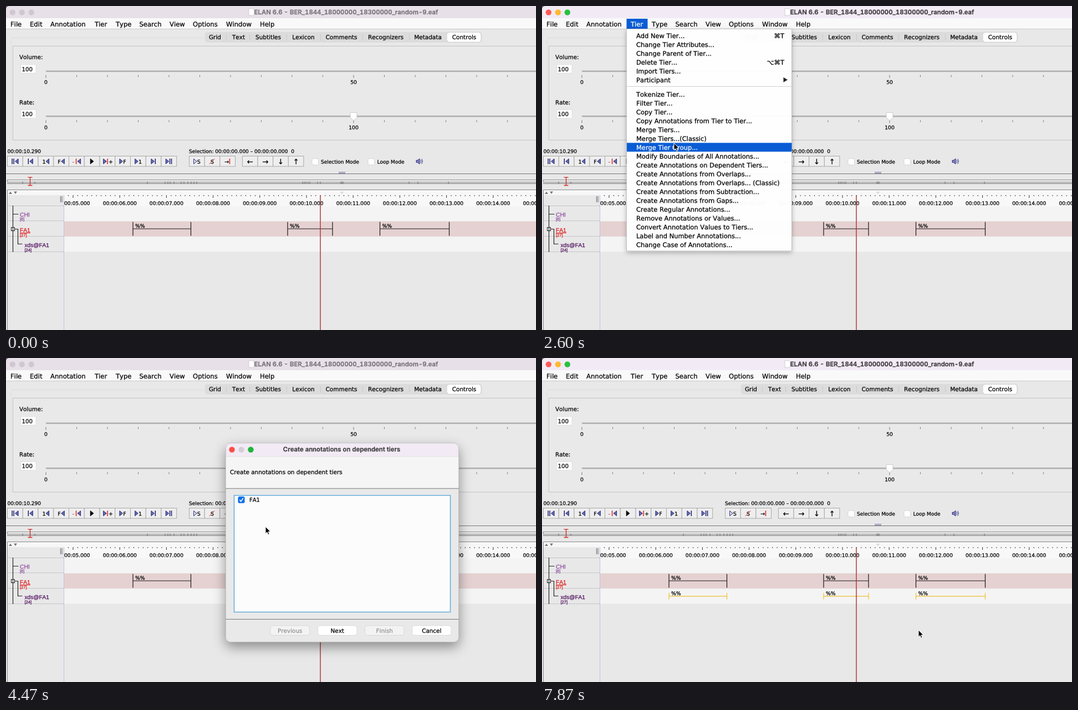
Write an HTML page that moves like this. It is 956 px wide and 586 px high and loops after 8000 ms.

```html
<!DOCTYPE html>
<html lang="en">
<head>
<meta charset="utf-8">
<title>Create annotations on dependent tiers</title>
<style>
html, body { margin: 0; width: 100%; height: 100%; overflow: hidden; background: #e8e8e8; }
svg { display: block; width: 956px; height: 586px; }
text {
  font-family: "DejaVu Sans", sans-serif; font-kerning: none; white-space: pre;
  text-rendering: geometricPrecision; fill: currentColor; stroke: currentColor; stroke-width: .25px;
}
.title {
  font-family: Inter, sans-serif; font-weight: 600; font-size: 11.35px; text-anchor: middle;
  font-variant-numeric: tabular-nums;
}
.tier, .tier text { font-family: "Liberation Sans", sans-serif; }
</style>
</head>
<body>
<svg id="stage" viewBox="0 0 956 586"></svg>
<script>
const LOOP = 8000;
const BLUE = '#0a5cd5', ACCENT = '#0a6fe8', NAVY = '#25257c';

const rect = (x, y, w, h, fill, extra = '') =>
  `<rect x="${x}" y="${y}" width="${w}" height="${h}" fill="${fill}" ${extra}/>`;
const path = (d, stroke, width = 1, fill = 'none') =>
  `<path d="${d}" stroke="${stroke}" stroke-width="${width}" fill="${fill}"/>`;
const circle = (x, y, r, fill, extra = '') => `<circle cx="${x}" cy="${y}" r="${r}" fill="${fill}" ${extra}/>`;
const text = (x, y, size, str, color = '#000', extra = '') =>
  `<text x="${x}" y="${y}" font-size="${size}" color="${color}" ${extra}>${str}</text>`;
const centered = (x, y, size, str, color = '#000') => text(x, y, size, str, color, 'text-anchor="middle"');
const group = (id, content, extra = '') => `<g id="${id}" ${extra}>${content}</g>`;
const range = n => Array.from({ length: n }, (_, i) => i);

const MENUS = [['File', 8], ['Edit', 43], ['Annotation', 80], ['Tier', 160], ['Type', 198], ['Search', 240.5],
  ['View', 295], ['Options', 337], ['Window', 397], ['Help', 458]];

function titleBar() {
  const bar = fill => `<path d="M0 22V6Q0 0 6 0H956V22Z" fill="${fill}"/>`;
  const lights = colors => colors.map((c, i) => circle(11.8 + 17 * i, 11.5, 5.2, c)).join('');
  const title = color => path('M438 4.5h6l3.500 3.500v9h-9.500z', '#c9c4cb', 0.8, '#fff') +
    `<text class="title" x="613.500" y="15" color="${color}">ELAN 6.6 - BER_1844_18000000_18300000_random-9.eaf</text>`;
  const greys = Array(3).fill('#cfc8d1');
  return group('inactive', bar('#e8e0e9') + lights(greys) + title('#757078')) +
    group('active', bar('#f2eaf4') + lights(['#fc5b55', '#fdb92d', '#27c13f']) + title('#39363b'));
}

function menuBar() {
  return rect(0, 22, 956, 19, '#f9f9f9') + path('M0 41.5H956', '#c9c9c9') +
    MENUS.map(([name, x]) => text(x, 36.7, 11.6, name)).join('');
}

function tabs() {
  const names = [['Grid', 377], ['Text', 419.5], ['Subtitles', 473], ['Lexicon', 536.5], ['Comments', 605],
    ['Recognizers', 685], ['Metadata', 761], ['Controls', 826.5]];
  const gaps = [397.5, 439.5, 506.5, 567.5, 643.5, 727.5].map(x => `M${x} 51v11`).join('');
  return path('M9.500 243V62Q9.500 57.500 14 57.500H358', '#dedede') +
    rect(12.5, 72.5, 960, 170, '#e9e9e9', 'stroke="#c3c3c3"') +
    rect(358.5, 47, 500, 19, '#dcdcdc', 'rx="5"') + path(gaps, '#cacaca') +
    rect(795, 47.5, 62, 18, '#fff', 'rx="5" stroke="#c6c6c6" stroke-width=".8"') +
    names.map(([name, x]) => centered(x, 60.4, 10.5, name)).join('');
}

function slider(label, y, half) {
  const ticks = range(16).map(i => `M${72 + i * 55.5} ${y + 7}v${i % 10 ? 3.5 : 5}`).join('');
  return text(24, y - 22, 10.3, label) +
    rect(26.5, y - 12, 27.5, 15.5, '#fff', 'stroke="#d7d7d7" stroke-width=".7"') + text(28.5, y - 0.5, 10.2, 100) +
    path(`M72 ${y}H956`, '#aeaeae', 2.6) + path(ticks, '#777') +
    centered(72, y + 23, 9.2, 0) + centered(627, y + 23, 9.2, half);
}

// Icon letters: | bar, ! red bar, L and R triangles, P black triangle, O outlined triangle, others are text.
function icon(spec, cx, cy) {
  const widths = { '|': 3, '!': 3, L: 7, R: 7, P: 7, O: 7, '→': 8 };
  const width = c => widths[c] || 6;
  let x = cx - [...spec].reduce((sum, c) => sum + width(c), 0) / 2;
  return [...spec].map(c => {
    const x0 = x;
    x += width(c);
    if (c === '|' || c === '!') return path(`M${x0 + 1.2} ${cy - 5}v10`, c === '!' ? '#e32a2a' : NAVY, 1.6);
    if (c === 'L') return path(`M${x0 + 6.2} ${cy - 4.5}v9l-5.500 -4.500z`, NAVY, 1, '#6a6dab');
    if (c === 'P') return path(`M${x0 + 0.5} ${cy - 4.8}v9.600l6 -4.800z`, '#000', 0.7, '#000');
    if (c === 'R' || c === 'O')
      return path(`M${x0 + 0.8} ${cy - 4.5}v9l5.500 -4.500z`, NAVY, 1, c === 'R' ? '#6a6dab' : '#e3e3f5');
    return text(x0, cy + 3.6, 9.5, c, c === '-' ? '#e32a2a' : '#000');
  }).join('');
}

function buttonRow(x, width, icons) {
  return icons.map((spec, i) => {
    const left = x + i * width, cx = left + width / 2;
    const glyph = '←→↓↑'.includes(spec) ? centered(cx, 285.5, 13, spec) : icon(spec, cx, 281);
    return rect(left, 271.5, width, 18.5, '#eeeeee', 'stroke="#a2a2a2" stroke-width=".9"') + glyph;
  }).join('');
}

function transport() {
  const check = x => rect(x, 276, 11.5, 11.5, '#fff', 'rx="2.500" stroke="#c9c9c9" stroke-width=".7"');
  return text(2.5, 265.5, 9, '00:00:10.290') +
    text(330, 265.5, 9, 'Selection: 00:00:00.000 – 00:00:00.000  0') +
    buttonRow(2.5, 27.75, ['||L', '|L', '1L', 'FL', '-!L', 'P', 'R!+', 'RF', 'R1', 'R|', 'R||']) +
    buttonRow(330.5, 27.7, ['OS', 'S', '→!']) + path('M366.500 286l10 -10', '#e32a2a') +
    buttonRow(426.5, 27.6, ['←', '→', '↓', '↑']) +
    check(552) + text(568, 285, 9, 'Selection Mode') + check(653) + text(669.5, 285, 9, 'Loop Mode') +
    path('M740 279h2.500l3.500 -3v10l-3.500 -3h-2.500z', NAVY, 0.9, '#7c7fb8') +
    path('M748 278q2 3 0 6M750 276.500q3 4.500 0 9', NAVY, 0.9);
}

function density() {
  const marks = [30, 52, 255, 287, 292, 296, 303, 316, 321, 328, 334, 339, 344, 535, 538, 541, 545, 548, 562, 567,
    604, 606, 608, 727, 743, 798];
  return path('M600 300.500h12M600 302.500h12', '#7a7da8') + path('M0 303.500H956', '#777') +
    rect(2.5, 314.5, 960, 4, '#ececec', 'stroke="#777" stroke-width=".8"') +
    path('M2 321H956', '#8b8b8b', 1.6) +
    path(marks.map(x => `M${x} 317.500v4`).join(''), '#555', 0.8) +
    path('M43.500 310v14.500M39.500 309.800h8M39.500 324.500h8', '#d42727', 1.3);
}

const SPANS = [[229, 333.5], [508, 589], [674.5, 799.5]];
const annotations = (mid, reach, color, baseline) => SPANS.map(([a, b]) =>
  path(`M${a} ${mid - reach}v${2 * reach}M${b} ${mid - reach}v${2 * reach}M${a} ${mid}H${b}`, color, 1.2) +
  text(a + 4, baseline, 9.3, '%%')).join('');

function timeline() {
  const secondX = s => 542 + (s - 10) * 84.2;
  const ticks = range(105).map(i => {
    const x = secondX(4.8 + i / 10);
    return x < 106 ? '' : `M${x.toFixed(1)} 342v${i % 10 === 2 ? 5 : 2}`;
  }).join('');
  const labels = range(11).map(i => centered(secondX(5 + i), 360, 9.1, `00:00:${String(5 + i).padStart(2, 0)}.000`));
  return path('M2.500 586V332.500H956', '#888') + rect(3, 333, 953, 9, '#f7f7f7') +
    rect(3, 342, 102, 244, '#e8e8e8') + rect(105, 342, 851, 20, '#f8f8f8') +
    rect(105, 362, 851, 27.5, '#f4f4f4') + rect(105, 389.5, 851, 27.5, '#e5d1d1') + rect(105, 417, 851, 27.5, '#f4f4f4') +
    path('M5 340l3 -4.500 3 4.500zM14 335.500h6l-3 4.500z', 'none', 0, '#777') +
    circle(606, 337.5, 2.2, '#dadada') + path('M98.500 344v11M101 344v11', '#777', 1.2) +
    path('M4 361.500H104M4 388.500H104M4 416.500H104M4 444.500H104', '#c5c5cc') + path('M104.500 342V586', '#c5bfe6') +
    path(ticks, '#333') + `<g clip-path="url(#ruler)">${labels.join('')}</g>` +
    path('M12.500 361V445M12.500 376.500h10M16 403.500h5.500V430.500h8', '#222', 1.2) +
    rect(9.5, 400.5, 6, 6, '#e8e8e8', 'stroke="#222"') + path('M12.500 401v5', '#222') +
    '<g class="tier">' +
    text(25, 380.5, 10.4, 'CHI', '#8d4a9e') + text(25, 388, 7.6, '[8]', '#8d4a9e') +
    text(25, 408.5, 10.2, 'FA1', '#e01818') + path('M25 410.500h19', '#e01818') + text(25, 416.5, 7.6, '[27]', '#e01818') +
    text(33.5, 436, 10.1, 'xds@FA1', '#4d0c5c') +
    group('before', text(33.5, 443.5, 7.6, '[24]', '#4d0c5c')) + '</g>' +
    annotations(403, 12.5, '#1a1616', 400.5) +
    group('after', text(33.5, 443.5, 7.6, '[27]', '#4d0c5c', 'class="tier"') + annotations(430.8, 6, '#f0c02e', 428.5)) +
    path('M567 342V586', '#ad3a3a', 1.5);
}

const ITEMS = ['Add New Tier...', 'Change Tier Attributes...', 'Change Parent of Tier...', 'Delete Tier...',
  'Import Tiers...', 'Participant', 'Tokenize Tier...', 'Filter Tier...', 'Copy Tier...',
  'Copy Annotations from Tier to Tier...', 'Merge Tiers...', 'Merge Tiers...(Classic)', 'Merge Tier Group...',
  'Modify Boundaries of All Annotations...', 'Create Annotations on Dependent Tiers...',
  'Create Annotations from Overlaps...', 'Create Annotations from Overlaps... (Classic)',
  'Create Annotations from Subtraction...', 'Create Annotations from Gaps...', 'Create Regular Annotations...',
  'Remove Annotations or Values...', 'Convert Annotation Values to Tiers...', 'Label and Number Annotations...',
  'Change Case of Annotations...'];
const itemY = i => 53.5 + 16 * i + (i > 5 ? 10 : 0);

function tierMenu() {
  const shortcut = (y, str) => text(437, y + 4, 11.45, str, '#000', 'text-anchor="end"');
  return rect(152.5, 23, 38, 18.5, BLUE) + text(160, 36.7, 11.6, 'Tier', '#fff') +
    rect(152.5, 41.5, 298, 401.5, '#fff', 'fill-opacity=".97" stroke="#b9b9b9" stroke-width=".8" filter="url(#menuShadow)"') +
    path('M153 145.500H450', '#cfcfcf') +
    rect(153, 0, 297.5, 16, BLUE, 'id="hover"') +
    ITEMS.map((name, i) => text(170, itemY(i) + 4, 11.45, name, '#000', 'class="item"')).join('') +
    shortcut(53.5, '⌘T') + shortcut(101.5, '⌥⌘T') + path('M435.500 129v9l7.500 -4.500z', 'none', 0, '#222');
}

function dialog() {
  const button = (x, label, enabled, focus) =>
    rect(x, 484, 70.5, 17.5, enabled ? '#fff' : '#f3f3f3',
      `rx="4" stroke="${focus ? '#5a7199' : '#d3d3d3'}" stroke-width="${focus ? 1.5 : 0.8}"`) +
    centered(x + 35.25, 496.5, 10.4, label, enabled ? '#000' : '#929292');
  const buttons = page =>
    button(477, 'Previous', page === 2) + button(562.5, 'Next', page === 1) +
    button(647.5, 'Finish', page === 2) + button(732.5, 'Cancel', true, page === 2);
  const ticked = y => rect(418.5, y - 6, 12, 12, ACCENT, 'rx="2.500"') +
    path(`M421.500 ${y}l2.300 3 4 -6`, '#fff', 1.6);
  const off = x => circle(x, 270, 6, '#fff', 'stroke="#cdcdcd" stroke-width=".8"');
  const on = x => circle(x, 270, 6.2, ACCENT) + circle(x, 270, 2.3, '#fff');
  const page1 = rect(411.5, 248.5, 390, 211, '#fcfcfc', 'stroke="#5ba8da" stroke-width="1.400"') +
    ticked(256.5) + text(439, 260, 10, 'FA1') + buttons(1);
  const page2 = rect(411.5, 248.5, 390, 187.5, '#fcfcfc', 'stroke="#858585"') +
    rect(559, 263, 120, 13, '#ebebeb') + rect(680, 263, 119, 13, '#ebebeb') +
    path('M437.500 250v12M558.500 250v12M679.500 250v12', '#d5d5d5') +
    text(441, 259, 9, 'Tiers') + text(561, 259, 9, 'Empty Annotations') + text(682, 259, 9, 'Annotation With Value o...') +
    ticked(270) + text(439, 273.5, 10, 'xds@FA1') +
    group('emptyChoice', on(570) + off(691.5)) + group('valueChoice', off(570) + on(691.5)) +
    rect(417, 445, 12, 12, '#fff', 'rx="2.500" stroke="#c9c9c9" stroke-width=".8"') +
    text(434, 455, 10.4, 'Overwrite the annotation values') + buttons(2);
  return rect(396, 153.5, 421, 360.5, '#e9e9e9', 'rx="9" filter="url(#dialogShadow)"') +
    path('M396 178V162.500Q396 153.500 405 153.500H808Q817 153.500 817 162.500V178Z', 'none', 0, '#f2eaf4') +
    rect(396, 178, 421, 58, '#f5f5f5') + path('M396 178.200H817', '#ded6e0', 0.7) +
    path('M396 236H817M396 472.500H817', '#777', 1.2) +
    rect(396.3, 153.8, 420.4, 360, 'none', 'rx="9" stroke="#a9a9a9" stroke-width=".7"') +
    ['#fc5049', '#d5ced7', '#1fb53a'].map((c, i) => circle(407.5 + 17 * i, 165.7, 5.2, c)).join('') +
    '<text class="title" x="605.500" y="169" color="#3c393e">Create annotations on dependent tiers</text>' +
    text(404, 210, 10.45, 'Create annotations on dependent tiers') + group('page1', page1) + group('page2', page2);
}

const shadow = (id, dy, blur, alpha) =>
  `<filter id="${id}" x="-20%" y="-20%" width="140%" height="150%">
    <feDropShadow dx="0" dy="${dy}" stdDeviation="${blur}" flood-opacity="${alpha}"/></filter>`;

document.getElementById('stage').innerHTML =
  `<defs><clipPath id="ruler"><rect x="105" y="342" width="851" height="22"/></clipPath>
    ${shadow('menuShadow', 3, 4, 0.28)}${shadow('dialogShadow', 9, 11, 0.4)}</defs>` +
  rect(0, 0, 956, 586, '#e8e8e8') + rect(0, 0, 12, 12, '#51446b') +
  titleBar() + menuBar() + tabs() + slider('Volume:', 118, 50) + slider('Rate:', 199.5, 100) +
  path('M621 194.500q0 -2 2 -2h8q2 0 2 2v7l-6 6l-6 -6z', '#bdbdbd', 0.8, '#fff') +
  transport() + density() + timeline() + group('menu', tierMenu()) + group('dialog', dialog()) +
  group('cursor', path('M0 0V12.500L2.900 9.900L4.900 14.500L7 13.600L5 9.100H9Z', '#fff', 1, '#000'));

const $ = id => document.getElementById(id);
const items = [...document.querySelectorAll('.item')];
const show = (id, visible) => { $(id).style.display = visible ? '' : 'none'; };

// Cursor stops: time, x, y
const STOPS = [[270, 956, 420], [730, 620, 330], [870, 620, 330], [1670, 172, 29], [2070, 172, 29],
  [2600, 238, 248], [2730, 241, 256], [2870, 241, 256], [3670, 250, 281], [4200, 250, 281], [4470, 468, 305],
  [4600, 472, 310], [5130, 598, 490], [5470, 598, 490], [5950, 691, 268], [6100, 691, 268],
  [6270, 690, 286], [6870, 679, 492]];

function cursorAt(t) {
  const next = STOPS.findIndex(stop => stop[0] > t);
  if (next < 0) return STOPS[STOPS.length - 1].slice(1);
  if (next === 0) return STOPS[0].slice(1);
  const [t0, x0, y0] = STOPS[next - 1], [t1, x1, y1] = STOPS[next];
  const k = (t - t0) / (t1 - t0), e = k * k * (3 - 2 * k);
  return [x0 + (x1 - x0) * e, y0 + (y1 - y0) * e];
}

function render(t) {
  const within = (from, to) => t >= from && t < to;
  const active = within(1730, 4400) || t >= 7670;
  show('active', active);
  show('inactive', !active);
  show('menu', within(1730, 4270));
  show('dialog', within(4400, 7670));
  show('page1', t < 5200);
  show('page2', t >= 5200);
  show('emptyChoice', t < 6040);
  show('valueChoice', t >= 6040);
  show('before', t < 7730);
  show('after', t >= 7730);
  show('cursor', t >= 270);

  const [x, y] = cursorAt(t);
  $('cursor').setAttribute('transform', `translate(${x.toFixed(1)} ${y.toFixed(1)})`);
  const hovered = ITEMS.findIndex((_, i) => Math.abs(y - itemY(i)) <= 8);
  show('hover', hovered >= 0);
  if (hovered >= 0) $('hover').setAttribute('y', itemY(hovered) - 8);
  items.forEach((item, i) => item.setAttribute('color', i === hovered ? '#fff' : '#000'));
}

const start = performance.now();
function tick() {
  render((performance.now() - start) % LOOP);
  requestAnimationFrame(tick);
}
tick();
</script>
</body>
</html>
```
